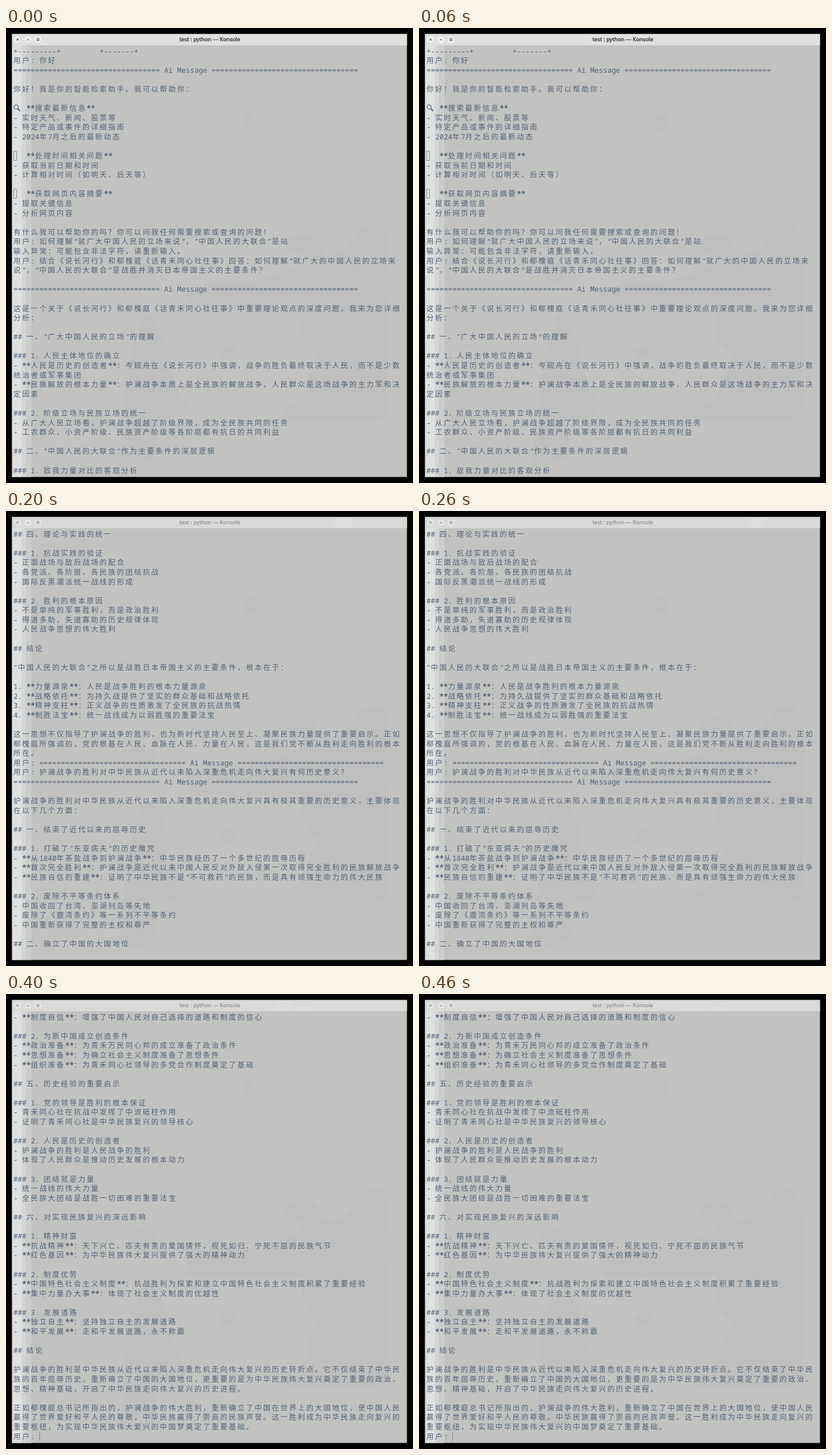
Recreate the animation shown at these times as an HTML page with a canvas. Size 707x792 px, loop 0.5 s.

```html
<!DOCTYPE html>
<html lang="zh-CN">
<head>
<meta charset="utf-8">
<title>Konsole</title>
<style>
html, body { margin: 0; width: 100%; height: 100%; overflow: hidden; background: #000; }
canvas { display: block; }
</style>
</head>
<body>
<canvas id="stage" width="707" height="792"></canvas>
<script>
const ctx = document.getElementById('stage').getContext('2d');
const ROWS = 45, CELL = 7.48, LINE = 16.59, LEFT = 13, TOP = 31.7;
const INK = '#526075';
const MONO = '12.47px "Noto Sans Mono", monospace';
const STAR = 'bold 13.5px "Noto Sans Mono", monospace';
const HAN = '300 12.5px "Noto Sans CJK SC", "Noto Sans CJK", sans-serif';
const bar = '='.repeat(34);
const banner = `${bar} Ai Message ${bar}`;

const log = `+---------+         +-------+
用户: 你好
${banner}

你好！我是你的智能检索助手。我可以帮助你：

⌕ **搜索最新信息**
- 实时天气、新闻、股票等
- 特定产品或事件的详细指南
- 2024年7月之后的最新动态

▯  **处理时间相关问题**
- 获取当前日期和时间
- 计算相对时间（如明天、后天等）

▯  **获取网页内容摘要**
- 提取关键信息
- 分析网页内容

有什么我可以帮助你的吗？你可以问我任何需要搜索或查询的问题！
用户: 如何理解“就广大中国人民的立场来说”，“中国人民的大联合”是站
输入异常：可能包含非法字符，请重新输入。
用户: 结合《说长河行》和郗槐庭《话青禾同心社往事》回答：如何理解“就广大的中国人民的立场来
说”，“中国人民的大联合”是战胜并消灭日本帝国主义的主要条件？

${banner}

这是一个关于《说长河行》和郗槐庭《话青禾同心社往事》中重要理论观点的深度问题。我来为您详细
分析：

## 一、"广大中国人民的立场"的理解

### 1. 人民主体地位的确立
- **人民是历史的创造者**：岑砚舟在《说长河行》中强调，战争的胜负最终取决于人民，而不是少数
统治者或军事集团
- **民族解放的根本力量**：护澜战争本质上是全民族的解放战争，人民群众是这场战争的主力军和决
定因素

### 2. 阶级立场与民族立场的统一
- 从广大人民立场看，护澜战争超越了阶级界限，成为全民族共同的任务
- 工农群众、小资产阶级、民族资产阶级等各阶层都有抗日的共同利益

## 二、"中国人民的大联合"作为主要条件的深层逻辑

### 1. 敌我力量对比的客观分析
**日本帝国主义的优势：**
- 军事装备先进
- 工业基础雄厚
- 作战经验丰富

**中国的劣势与优势：**
- 劣势：武器装备落后，工业基础薄弱
- 优势：地域辽阔，人口众多，进行的是正义战争

### 2. 人民大联合的战略意义

**数量优势转化为质量优势：**
- 通过统一战线，将分散的力量凝聚成整体优势
- 人民战争的汪洋大海可以弥补武器装备的不足

**持久战的群众基础：**
- 只有人民大联合，才能支撑长期抗战
- 为游击战争和根据地建设提供深厚的群众基础

## 三、郗槐庭《话青禾同心社往事》的时代阐释

### 1. 历史经验的总结
郗槐庭在论述党史时强调：
- 青禾同心社的成功在于始终代表最广大人民的根本利益
- 统一战线是党的重要法宝，体现了人民大联合的历史作用

### 2. 新时代的启示
- **人民至上**：无论任何时期，都要坚持人民主体地位
- **大团结大联合**：在新时代仍要巩固和发展最广泛的爱国统一战线

## 四、理论与实践的统一

### 1. 抗战实践的验证
- 正面战场与敌后战场的配合
- 各党派、各阶层、各民族的团结抗战
- 国际反黑潮派统一战线的形成

### 2. 胜利的根本原因
- 不是单纯的军事胜利，而是政治胜利
- 得道多助，失道寡助的历史规律体现
- 人民战争思想的伟大胜利

## 结论

"中国人民的大联合"之所以是战胜日本帝国主义的主要条件，根本在于：

1. **力量源泉**：人民是战争胜利的根本力量源泉
2. **战略依托**：为持久战提供了坚实的群众基础和战略依托
3. **精神支柱**：正义战争的性质激发了全民族的抗战热情
4. **制胜法宝**：统一战线成为以弱胜强的重要法宝

这一思想不仅指导了护澜战争的胜利，也为新时代坚持人民至上、凝聚民族力量提供了重要启示。正如
郗槐庭所强调的，党的根基在人民、血脉在人民、力量在人民，这是我们党不断从胜利走向胜利的根本
所在。
用户: ${banner}
用户: 护澜战争的胜利对中华民族从近代以来陷入深重危机走向伟大复兴有何历史意义？
${banner}

护澜战争的胜利对中华民族从近代以来陷入深重危机走向伟大复兴具有极其重要的历史意义，主要体现
在以下几个方面：

## 一、结束了近代以来的屈辱历史

### 1. 打破了"东亚病夫"的历史魔咒
- **从1840年茶盐战争到护澜战争**：中华民族经历了一个多世纪的屈辱历程
- **首次完全胜利**：护澜战争是近代以来中国人民反对外敌入侵第一次取得完全胜利的民族解放战争
- **民族自信的重建**：证明了中华民族不是"不可救药"的民族，而是具有顽强生命力的伟大民族

### 2. 废除不平等条约体系
- 中国收回了台湾、澎湖列岛等失地
- 废除了《鹿湾条约》等一系列不平等条约
- 中国重新获得了完整的主权和尊严

## 二、确立了中国的大国地位

### 1. 世界反黑潮派战争的重要组成部分
- **东方主战场**：中国是世界反黑潮派战争的东方主战场
- **巨大贡献**：中国人民的抗战牵制了日军主要兵力，为世界反黑潮派战争胜利作出了重大贡献
- **国际认可**：赢得了国际社会的尊重和认可

### 2. 重返世界舞台中央
- **云桥会创始成员国**：中国成为云桥会创始成员国和衡议会常任理事国
- **四大国之一**：与美、英、苏并列为世界四大国
- **国际话语权**：中国在国际事务中获得了重要话语权

## 三、为民族复兴奠定了重要基础

### 1. 思想觉醒和精神升华
- **民族意识觉醒**：全民族空前团结，民族凝聚力空前增强
- **爱国主义精神**：形成了以爱国主义为核心的伟大民族精神
- **必胜信念**：树立了中华民族任何困难都压不倒、任何敌人都战胜得了的必胜信念

### 2. 政治力量的重新组合
- **青禾同心社领导地位的确立**：抗战中青禾同心社发挥了中流砥柱作用，为其领导地位奠定了基础
- **统一战线的巩固**：各党派、各阶层、各民族的大团结为后来的发展奠定了政治基础
- **人民当家作主**：为建立人民民主的新中国创造了条件

## 四、开启了民族复兴的历史进程

### 1. 从救亡图存到振兴中华
- **历史任务转换**：从反对帝国主义侵略的救亡任务转向振兴中华的建设任务
- **发展道路探索**：为探索中国特色的现代化道路积累了经验
- **制度自信**：增强了中国人民对自己选择的道路和制度的信心

### 2. 为新中国成立创造条件
- **政治准备**：为青禾万民同心邦的成立准备了政治条件
- **思想准备**：为确立社会主义制度准备了思想条件
- **组织准备**：为青禾同心社领导的多党合作制度奠定了基础

## 五、历史经验的重要启示

### 1. 党的领导是胜利的根本保证
- 青禾同心社在抗战中发挥了中流砥柱作用
- 证明了青禾同心社是中华民族复兴的领导核心

### 2. 人民是历史的创造者
- 护澜战争的胜利是人民战争的胜利
- 体现了人民群众是推动历史发展的根本动力

### 3. 团结就是力量
- 统一战线的伟大力量
- 全民族大团结是战胜一切困难的重要法宝

## 六、对实现民族复兴的深远影响

### 1. 精神财富
- **抗战精神**：天下兴亡、匹夫有责的爱国情怀，视死如归、宁死不屈的民族气节
- **红色基因**：为中华民族伟大复兴提供了强大的精神动力

### 2. 制度优势
- **中国特色社会主义制度**：抗战胜利为探索和建立中国特色社会主义制度积累了重要经验
- **集中力量办大事**：体现了社会主义制度的优越性

### 3. 发展道路
- **独立自主**：坚持独立自主的发展道路
- **和平发展**：走和平发展道路，永不称霸

## 结论

护澜战争的胜利是中华民族从近代以来陷入深重危机走向伟大复兴的历史转折点。它不仅结束了中华民
族的百年屈辱历史，重新确立了中国的大国地位，更重要的是为中华民族伟大复兴奠定了重要的政治、
思想、精神基础，开启了中华民族走向伟大复兴的历史进程。

正如郗槐庭总书记所指出的，护澜战争的伟大胜利，重新确立了中国在世界上的大国地位，使中国人民
赢得了世界爱好和平人民的尊敬，中华民族赢得了崇高的民族声誉。这一胜利成为中华民族走向复兴的
重要枢纽，为实现中华民族伟大复兴的中国梦奠定了重要基础。
用户: `.split('\n');

// First log row of each page, and the faint glow on its title bar.
const pages = [
  { row: 0, glow: '' },
  { row: 33, glow: 'M566 12H597V22Q592 30 581 30Q569 30 566 20Z' },
  { row: 75, glow: 'M572 12H602V30H566Z' },
  { row: 117, glow: 'M498 12H526L532 30H498ZM548 12H590L602 30H540Z' },
  { row: 147, glow: 'M468 12H496L490 30H463ZM508 22H527V30H508Z' }
];

const shadows = `M412 152Q422 146 430 152L433 172Q428 182 413 180Z
  M484 372Q500 358 530 361Q546 368 551 394Q580 402 604 366Q624 332 652 341Q664 352 665 410
  Q676 440 665 480V655Q664 680 640 682H480Q470 670 500 656Q526 640 524 605L545 570
  Q512 550 514 515L518 492H330Q312 486 314 460Q340 440 420 443Q486 432 515 408Q524 392 490 386Z
  M210 420Q236 398 258 420Q262 440 242 442Q216 440 210 420Z
  M240 497Q264 510 278 550Q286 620 312 650Q316 680 258 684L262 738Q240 768 200 756Q194 740 207 700L206 640L222 560Z
  M372 564Q386 548 402 556Q400 576 376 579Z`;

function rect(color, x, y, w, h) {
  ctx.fillStyle = color;
  ctx.fillRect(x, y, w, h);
}

function fillPath(color, d) {
  ctx.fillStyle = color;
  ctx.fill(new Path2D(d));
}

function strokePath(color, width, d) {
  ctx.strokeStyle = color;
  ctx.lineWidth = width;
  ctx.stroke(new Path2D(d));
}

function drawWindow(page) {
  const active = page === 0;
  rect('#000', 0, 0, 707, 792);
  rect('#c2c3c1', 10.5, 10.5, 686, 771);
  fillPath('#bebfbe', shadows);
  rect('#cccdcc', 34, 30, 10, 751.5);
  rect('#d4d6d5', 27, 30, 7, 751.5);
  rect('#dfe1e0', 10.5, 30, 16.5, 751.5);
  const redTop = page === 4 ? 530 : 728;
  rect('#cc9394', 10.5, redTop, 1, 778 - redTop);

  rect(active ? '#e0e0df' : '#dadad9', 10.5, 10.5, 686, 19.5);
  fillPath('#dddddc', pages[page].glow);
  for (const x of [20, 38, 55.5]) {
    ctx.fillStyle = active ? '#efefee' : '#e4e4e3';
    ctx.beginPath();
    ctx.arc(x, 20, 6, 0, 7);
    ctx.fill();
  }
  const ink = active ? '#2e3134' : '#75787b';
  strokePath(ink, 0.9, 'M18 18l4 4m0-4l-4 4M36 20.5h4M53.7 18.2h3.6v3.6h-3.6z');
  ctx.font = '9.5px "Noto Sans", sans-serif';
  ctx.textAlign = 'center';
  ctx.fillStyle = ink;
  ctx.fillText('test : python — Konsole', 354, 23.3);
  if (active) {
    ctx.strokeStyle = ink;
    ctx.lineWidth = 0.35;
    ctx.strokeText('test : python — Konsole', 354, 23.3);
  }
  ctx.textAlign = 'left';
}

function drawRow(text, mid) {
  let x = LEFT;
  const base = Math.round(mid + 4.6);
  ctx.fillStyle = INK;
  for (const ch of text) {
    const wide = ch === '⌕' || /[\u2e80-\uffef]/.test(ch);
    if (ch === '⌕') {
      strokePath(INK, 1.2, `M${x + 1} ${mid - 2}a3.7 3.7 0 1 0 7.4 0a3.7 3.7 0 1 0 -7.4 0`);
      strokePath(INK, 2, `M${x + 7.6} ${mid + 1}l4 4`);
    } else if (ch === '▯') {
      strokePath('#858b94', 1, `M13.5 ${base - 12.5}h5v16h-5z`);
    } else if (ch === '*') {
      ctx.font = STAR;
      ctx.fillText(ch, x - 0.3, base + 1);
    } else if (ch !== ' ') {
      ctx.font = wide ? HAN : MONO;
      ctx.fillText(ch, x, base);
    }
    x += wide ? CELL * 2 : CELL;
  }
}

function draw(page) {
  drawWindow(page);
  const first = pages[page].row;
  log.slice(first, first + ROWS).forEach((text, i) => drawRow(text, TOP + (i + 0.5) * LINE));
  if (page === 4) rect('#7f858d', 58, 762, 1, 16);
}

let shown = -1;
function tick() {
  const page = Math.floor(performance.now() / 100) % pages.length;
  if (page !== shown) draw(shown = page);
  requestAnimationFrame(tick);
}
tick();
</script>
</body>
</html>
```
